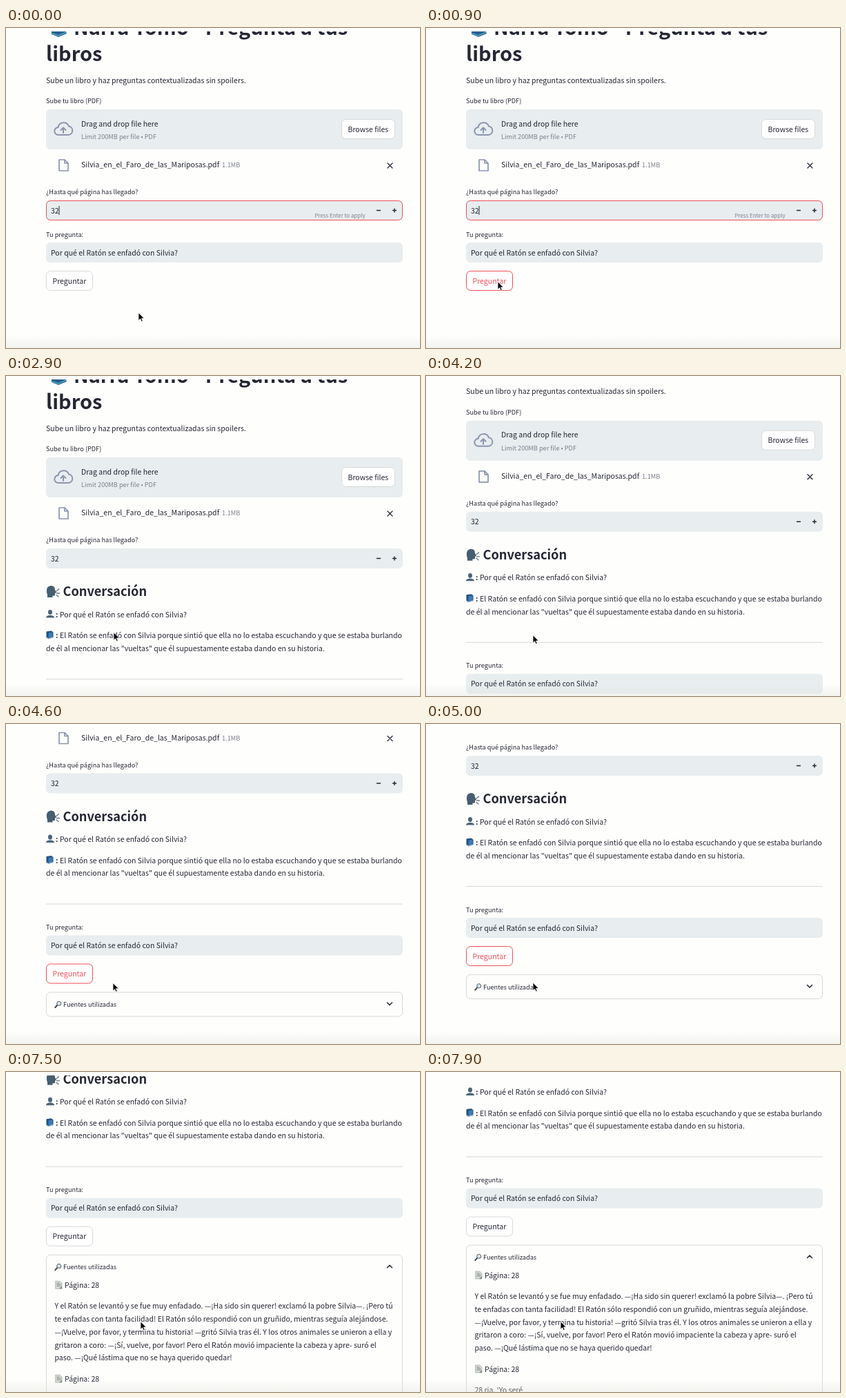
Recreate the animation shown at these times as an HTML page with a canvas. Size 600 px wide and 464 px high, loop 8 s.

```html
<!DOCTYPE html>
<html lang="es">
<head>
<meta charset="utf-8">
<title>Pregunta a tus libros</title>
<style>
html, body { margin: 0; width: 100%; height: 100%; overflow: hidden; background: #fefefc; }
canvas { display: block; width: 600px; height: 464px; }
</style>
</head>
<body>
<canvas id="stage"></canvas>
<script>
const W = 600, H = 464, LOOP = 8000, TOP = 5;
const FONT = '"Noto Sans CJK JP", "Noto Sans CJK SC", "Noto Sans CJK", "Noto Sans", sans-serif';
const BG = '#fefefc', FIELD = '#e8edef', INK = '#242634', GREY = '#7c7f8c',
      LINE = '#d8dad8', ACCENT = '#f24e58', ICON = '#8b95ae', WHITE = '#ffffff';
const BODY = 10.52, SMALL = 9.2;
const LEFT = 58, RIGHT = 575, WIDE = RIGHT - LEFT;

// Event times in ms
const BLUR = 1000, ASK = 1200, ANSWER = 2700, OPEN = 5100;

const canvas = document.getElementById('stage');
const dpr = window.devicePixelRatio || 1;
canvas.width = W * dpr;
canvas.height = H * dpr;
const c = canvas.getContext('2d');

const QUESTION = 'Por qué el Ratón se enfadó con Silvia?';
const ANSWER_LINES = [
  'El Ratón se enfadó con Silvia porque sintió que ella no lo estaba escuchando y que se estaba burlando',
  'de él al mencionar las "vueltas" que él supuestamente estaba dando en su historia.'
];
const PASSAGE = [
  'Y el Ratón se levantó y se fue muy enfadado. —¡Ha sido sin querer! exclamó la pobre Silvia—. ¡Pero tú',
  'te enfadas con tanta facilidad! El Ratón sólo respondió con un gruñido, mientras seguía alejándose.',
  '—¡Vuelve, por favor, y termina tu historia! —gritó Silvia tras él. Y los otros animales se unieron a ella y',
  'gritaron a coro: —¡Sí, vuelve, por favor! Pero el Ratón movió impaciente la cabeza y apre- suró el',
  'paso. —¡Qué lástima que no se haya querido quedar!'
];

const smooth = (t, a, b) => {
  const k = Math.min(1, Math.max(0, (t - a) / (b - a)));
  return k * k * (3 - 2 * k);
};

function text(s, x, y, size = BODY, color = INK, weight = 400) {
  c.font = `${weight} ${size}px ${FONT}`;
  c.fillStyle = color;
  c.fillText(s, x, y);
}

function box(x, y, w, h, r, fill, stroke) {
  c.beginPath();
  c.roundRect(x, y, w, h, r);
  if (fill) { c.fillStyle = fill; c.fill(); }
  if (stroke) { c.strokeStyle = stroke; c.lineWidth = 1; c.stroke(); }
}

function rect(x, y, w, h, color) {
  c.fillStyle = color;
  c.fillRect(x, y, w, h);
}

function path(d, x, y, { fill, stroke, width = 1.5 } = {}) {
  const p = new Path2D(d);
  c.save();
  c.translate(x, y);
  if (fill) { c.fillStyle = fill; c.fill(p); }
  if (stroke) {
    c.strokeStyle = stroke;
    c.lineWidth = width;
    c.lineCap = c.lineJoin = 'round';
    c.stroke(p);
  }
  c.restore();
}

function button(label, x, y, w, h, tx, hot) {
  box(x + .5, y + .5, w - 1, h - 1, 6, WHITE, hot ? ACCENT : LINE);
  text(label, tx, y + h / 2 + 4, BODY, hot ? ACCENT : INK);
}

function bookIcon(x, y) {
  path('M0 1L7 0L10 2V10L3 12L0 10Z', x, y, { fill: '#23507f' });
  path('M3 3L9 2V9L3 11Z', x, y, { fill: '#3a7db8' });
  path('M1 10L3 11.5L10 9.5', x, y, { stroke: '#dfe3e6', width: 1 });
}

function userIcon(x, y) {
  path('M3 3a3 3.4 0 1 1 6 0a3 3.6 0 1 1-6 0M0 11Q0 8 4.5 7.4H7.5Q12 8 12 11Z', x, y, { fill: '#4c6478' });
}

function talkIcon(x, y) {
  path('M1 9Q0 1 7 0Q13 0 13 6L15 10L13 11V14Q12 15 9.5 14.5V17H2V13Q1 11 1 9Z', x, y, { fill: '#465e70' });
  path('M15 8L18.5 5M15.5 11H19.5M15 13.5L18 16', x, y, { stroke: '#68767e', width: 1.3 });
}

function lensIcon(x, y) {
  path('M3.8 6.2L.8 9.5', x, y, { stroke: '#45454a', width: 2 });
  path('M3.2 3.7a3 3 0 1 1 6 0a3 3 0 1 1-6 0', x, y, { fill: '#d5e7ee', stroke: '#6c7278', width: 1.1 });
}

function pageIcon(x, y) {
  path('M1 0H7L10 3V11H1Z', x, y, { fill: '#d3d8d4', stroke: '#a3a9a4', width: .7 });
  path('M3 3H6M3 5H8M3 7H8', x, y, { stroke: '#758078', width: .8 });
  path('M6 11L10 7V11Z', x, y, { fill: '#7d9080' });
}

function header() {
  path('M66 5L84 2L88 8L76 13L66 9Z', 0, 0, { fill: '#26608f' });
  path('M67 8L76 11L87 6', 0, 0, { stroke: '#55a3bd', width: 1.5 });
  text('Narra Tomo - Pregunta a tus', 98, 9.5, 29, INK, 700);
  text('libros', LEFT, 47.5, 29, INK, 700);
  text('Sube un libro y haz preguntas contextualizadas sin spoilers.', LEFT, 79.5);
}

function uploader() {
  text('Sube tu libro (PDF)', LEFT, 109.3, SMALL);
  box(LEFT, 118, WIDE, 58, 6, FIELD);
  path('M7 20H6A5.5 5.5 0 0 1 5.6 9A8 8 0 0 1 21 7.5A6.3 6.3 0 0 1 20.5 20H7Z', 70, 135,
    { stroke: ICON, width: 2 });
  path('M13 17V10M9.5 13L13 9.5L16.5 13', 70, 135, { stroke: ICON, width: 2 });
  text('Drag and drop file here', 109, 142.5);
  text('Limit 200MB per file • PDF', 109, 161, SMALL, GREY);
  button('Browse files', 486, 132, 78, 29, 495.5);
  path('M1 1H9L14 6V17H1ZM9 1V6H14', 76, 190, { stroke: ICON, width: 1.7 });
  text('Silvia_en_el_Faro_de_las_Mariposas.pdf', 109, 202);
  text('1.1MB', 313, 202, SMALL, GREY);
  path('M0 0L7 7M7 0L0 7', 553, 196, { stroke: INK, width: 1.3 });
}

function pageNumber(focused) {
  text('¿Hasta qué página has llegado?', LEFT, 241, SMALL);
  box(LEFT, 250, WIDE, 29, 6, FIELD);
  text('32', 65, 268.5);
  path('M0 0H5M23 0H28M25.5-2.5V2.5', 537.5, 264.5, { stroke: INK, width: 1.4 });
  if (focused) {
    box(LEFT + .5, 250.5, WIDE - 1, 28, 6, null, ACCENT);
    rect(76.5, 258, 1, 13, INK);
    text('Press Enter to apply', 447.5, 274.5, 7.9, GREY);
  }
}

// Question form; y is the top of its input
function form(y, hot) {
  text('Tu pregunta:', LEFT, y - 8.5, SMALL);
  box(LEFT, y, WIDE, 29, 6, FIELD);
  text(QUESTION, 65, y + 18.5);
  button('Preguntar', LEFT, y + 41, 68, 29, 67.5, hot);
}

function spinner(t) {
  const a = (t - 1900) / 1000 * Math.PI * 2 - 2.1;
  c.lineWidth = 2;
  c.lineCap = 'butt';
  c.strokeStyle = '#dfe3e4';
  c.beginPath();
  c.arc(66, 403, 7, 0, 7);
  c.stroke();
  c.strokeStyle = '#2b7fcb';
  c.beginPath();
  c.arc(66, 403, 7, a, a + Math.PI / 2);
  c.stroke();
  text('Buscando respuesta...', 80, 407);
}

function conversation() {
  talkIcon(58, 304);
  text('Conversación', 82.5, 319, 18.2, INK, 700);
  userIcon(58, 339.5);
  text(':', 72, 349.5, BODY, INK, 700);
  text(QUESTION, 78, 349.5);
  bookIcon(58.5, 369.5);
  text(':', 72, 380, BODY, INK, 700);
  text(ANSWER_LINES[0], 78, 380);
  text(ANSWER_LINES[1], LEFT, 398.7);
  rect(LEFT, 439, WIDE, 1, LINE);
}

function sources(t, hover) {
  const k = smooth(t, OPEN, OPEN + 250);
  const h = 35 + 260 * k;
  const tint = hover ? ACCENT : INK;
  box(LEFT + .5, 567.5, WIDE - 1, h, 6, null, LINE);
  lensIcon(70.5, 580);
  text('Fuentes utilizadas', 83, 588.5, SMALL, tint);
  path(k > .5 ? 'M0 3.5L3.5 0L7 3.5' : 'M0 0L3.5 3.5L7 0', 552.5, 582.5, { stroke: tint, width: 1.5 });
  if (!k) return;
  c.save();
  c.beginPath();
  c.rect(LEFT, 567, WIDE, h);
  c.clip();
  for (const y of [615, 751]) {
    pageIcon(71, y - 9.5);
    text('Página: 28', 85, y);
  }
  PASSAGE.forEach((s, i) => text(s, 70.5, 645.5 + i * 18.8));
  text('28 ria. ‘Yo seré', 70.5, 781);
  c.restore();
}

// Pointer stops: time, x, y
const STOPS = [
  [0, 192, 413], [100, 192, 413], [800, 104, 368], [1150, 104, 368], [1700, 156, 371],
  [2900, 156, 372], [4200, 155, 376], [5500, 155, 375], [6250, 195, 336],
  [6500, 195, 336], [6950, 195, 362], [LOOP, 195, 362]
];

function pointerAt(t) {
  const i = Math.max(1, STOPS.findIndex(p => p[0] >= t));
  const [t0, x0, y0] = STOPS[i - 1], [t1, x1, y1] = STOPS[i];
  const k = smooth(t, t0, t1);
  return [x0 + (x1 - x0) * k, y0 + (y1 - y0) * k];
}

const scrollAt = t =>
  204 * smooth(t, 3900, 4800) + 44 * smooth(t, 5150, 5420) + 68.5 * smooth(t, 6900, 7750);

function draw(t) {
  const [px, py] = pointerAt(t), scroll = scrollAt(t);
  const over = (x, y, w, h) => px > x && px < x + w && py + scroll > y && py + scroll < y + h;

  c.setTransform(dpr, 0, 0, dpr, 0, 0);
  rect(0, 0, W, H, BG);
  c.save();
  c.beginPath();
  c.rect(0, TOP, W, H - TOP);
  c.clip();
  c.translate(0, -scroll);
  header();
  uploader();
  pageNumber(t < BLUR);
  if (t < ANSWER) {
    form(311, t >= BLUR || over(LEFT, 352, 68, 29));
    if (t >= ASK) spinner(t);
  } else {
    conversation();
    form(485, t < OPEN);
    sources(t, t >= OPEN && over(LEFT, 567, WIDE, 35));
  }
  c.restore();
  const shade = c.createLinearGradient(0, 446, 0, H);
  shade.addColorStop(0, 'rgba(225,226,222,0)');
  shade.addColorStop(1, 'rgba(225,226,222,.4)');
  rect(0, 446, W, 18, shade);
  path('M0 0V11L2.6 8.7L4.4 12.6L6.2 11.8L4.5 8H8Z', px, py, { fill: '#08080c', stroke: WHITE, width: .7 });
}

const start = performance.now();
function tick() {
  draw((performance.now() - start) % LOOP);
  requestAnimationFrame(tick);
}
draw(0);
requestAnimationFrame(tick);
</script>
</body>
</html>
```
